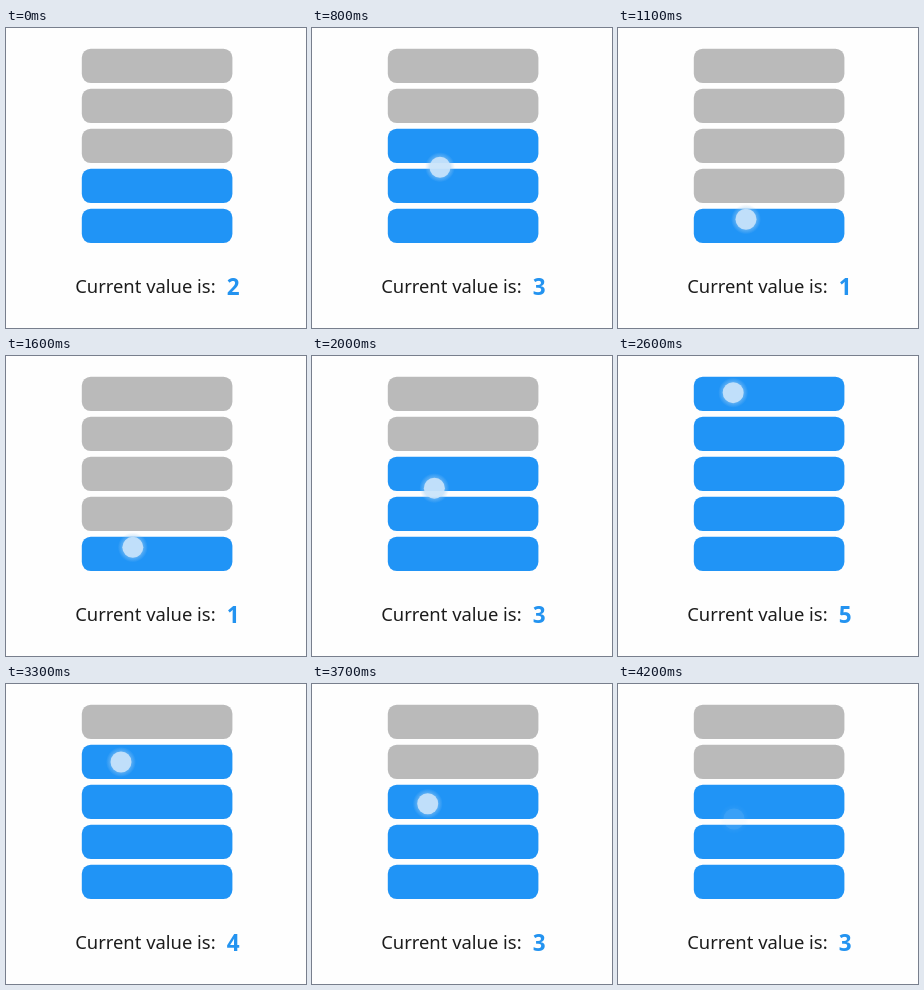
Animation, 300 px wide and 300 px high, one loop 4.3 s. Source, as an HTML page:

```html
<!DOCTYPE html>
<html lang="en">
<head>
<meta charset="utf-8">
<title>Level picker</title>
<style>
  html, body { margin: 0; width: 100%; height: 100%; overflow: hidden; background: #fefefe; }
  svg { display: block; width: 100%; height: 100%; }
  text { font-family: "Noto Sans", "Open Sans", sans-serif; }
  .label { font-size: 18.4px; fill: #1c1c1c; }
  .value { font-size: 22.5px; font-weight: 700; fill: #2393f0; }
</style>
</head>
<body>
<svg viewBox="0 0 300 300">
  <defs>
    <radialGradient id="halo">
      <stop offset=".6" stop-color="#9ccbf2" stop-opacity=".6"/>
      <stop offset="1" stop-color="#9ccbf2" stop-opacity="0"/>
    </radialGradient>
  </defs>
  <g id="bars"></g>
  <text class="label" x="69.2" y="265">Current value is:</text>
  <text class="value" id="value" x="220.7" y="266.5">2</text>
  <g id="touch">
    <circle r="15" fill="url(#halo)"/>
    <circle r="10.5" fill="#cfe6fa" fill-opacity=".85"/>
  </g>
</svg>
<script>
  const LOOP = 4300, STEP = 100, BARS = 5, PITCH = 40, BASE = 219.5;
  const ON = '#2094f6', OFF = '#bababa';

  const easeInOut = k => (1 - Math.cos(Math.PI * k)) / 2;
  const easeOut = k => Math.sin(Math.PI * k / 2);

  // The finger glides between its turning points.
  const turns = [
    { t: 600, x: 128, y: 123.5 },
    { t: 1300, x: 128, y: 207, ease: easeInOut },
    { t: 2900, x: 114, y: 21, ease: easeInOut },
    { t: 4100, x: 116, y: 135, ease: easeOut },
  ];
  const press = turns[0].t, release = turns[turns.length - 1].t;

  const svgNS = 'http://www.w3.org/2000/svg';
  const bars = Array.from({ length: BARS }, (_, i) => {
    const bar = document.createElementNS(svgNS, 'rect');
    const box = { x: 75.8, y: 180.7 - i * PITCH, width: 150.6, height: 34.4, rx: 9 };
    for (const key in box) bar.setAttribute(key, box[key]);
    document.getElementById('bars').append(bar);
    return bar;
  });
  const touch = document.getElementById('touch');
  const label = document.getElementById('value');

  function fingerAt(t) {
    const i = turns.findIndex(turn => turn.t > t);
    if (i < 0) return turns[turns.length - 1];
    const a = turns[i - 1], b = turns[i];
    const k = b.ease((t - a.t) / (b.t - a.t));
    return { x: a.x + (b.x - a.x) * k, y: a.y + (b.y - a.y) * k };
  }

  function render(t) {
    let value = 2, opacity = 0;
    if (t >= press) {
      const { x, y } = fingerAt(t);
      value = Math.max(1, Math.min(BARS, Math.ceil((BASE - y) / PITCH)));
      opacity = t > release ? 0.16 : 1;
      touch.setAttribute('transform', `translate(${x} ${y})`);
    }
    touch.setAttribute('opacity', opacity);
    bars.forEach((bar, i) => bar.setAttribute('fill', i < value ? ON : OFF));
    label.textContent = value;
  }

  const start = performance.now();
  function tick() {
    const t = (performance.now() - start) % LOOP;
    render(Math.floor(t / STEP) * STEP);
    requestAnimationFrame(tick);
  }
  tick();
</script>
</body>
</html>
```
